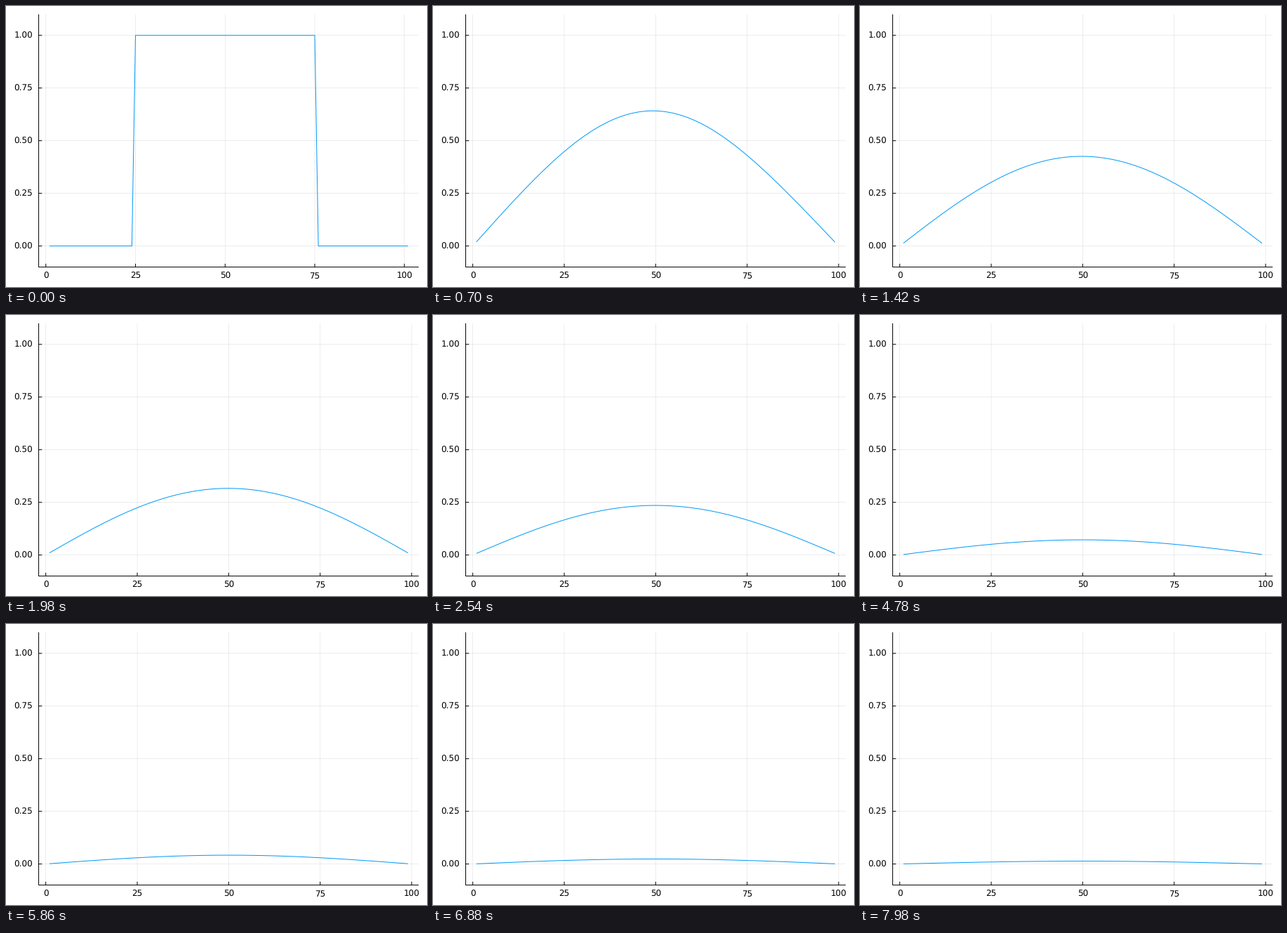
Recreate the animation shown at these times as a matplotlib script. Size 600 by 400 pixels, loop 8 s.

```python
import numpy as np
import matplotlib.pyplot as plt
from matplotlib.animation import FuncAnimation

plt.rcParams["font.family"] = "DejaVu Sans"
plt.rcParams["text.hinting"] = "none"

W, H, DPI = 600, 400, 100
PT = 72 / DPI                      # points per pixel
LEFT, RIGHT, TOP, BOTTOM = 46.57, 588.19, 11.81, 371.61
TICK = 4.72
Y_LO, Y_HI = -0.1, 1.1
X_TICKS = [0, 25, 50, 75, 100]
Y_TICKS = [0, 0.25, 0.5, 0.75, 1]

STEP_MS, LOOP_MS = 20, 8000
DT = 0.0025                        # heat equation time per picture
N = 100                            # grid intervals on [0, 1]

# Sine modes of the discrete Laplacian with zero ends
idx = np.arange(1, N)
modes = np.sin(np.pi * np.outer(idx, idx) / N)
box = ((idx >= 24) & (idx <= 74)).astype(float)
coef = modes @ box * 2 / N
rate = 2 * (1 - np.cos(np.pi * idx / N)) * N**2


def profile(k):
    """Points of the curve after k time steps."""
    if k == 0:
        x = np.arange(1, N + 2)
        return x, ((x >= 25) & (x <= 75)).astype(float)
    return idx, modes @ (coef * np.exp(-rate * DT * k))


def picture_at(ms):
    """Pictures last 20, 100 and 20 ms in turn."""
    cycle, phase = divmod(ms, 140)
    return 3 * cycle + (phase >= 20) + (phase >= 120)


def x_scale(first, last):
    pad = 0.03 * (last - first)
    lo, hi = first - pad, last + pad
    return lambda x: LEFT + (np.asarray(x) - lo) / (hi - lo) * (RIGHT - LEFT)


def to_y(v):
    return BOTTOM - (np.asarray(v) - Y_LO) / (Y_HI - Y_LO) * (BOTTOM - TOP)


def verticals(xs, y0, y1):
    """Separate vertical strokes as one broken line."""
    gap = np.nan
    return (np.ravel([[x, x, gap] for x in xs]),
            np.ravel([[y0, y1, gap] for _ in xs]))


fig = plt.figure(figsize=(W / DPI, H / DPI), dpi=DPI, facecolor="white")
ax = fig.add_axes([0, 0, 1, 1])
ax.set_xlim(0, W)
ax.set_ylim(H, 0)
ax.axis("off")


def stroke(x=(), y=(), color="black", width=1.0, **kw):
    line, = ax.plot(x, y, color=color, lw=width * PT, snap=False,
                    solid_capstyle="butt", **kw)
    return line


def label(x, y, text, ha):
    return ax.text(x, y, text, ha=ha, va="baseline", fontsize=12 * PT,
                   color="black")


y_pos = to_y(Y_TICKS)
y_grid, x_grid = verticals(y_pos, LEFT, RIGHT)
y_tick, x_tick = verticals(y_pos, LEFT, LEFT + TICK)

grid_v = stroke(width=0.7, alpha=0.1)
stroke(x_grid, y_grid, width=0.7, alpha=0.1)
stroke([LEFT, LEFT, RIGHT], [TOP, BOTTOM, BOTTOM],
       solid_joinstyle="miter")
ticks_v = stroke()
stroke(x_tick, y_tick)
curve = stroke(color="#009AF9", solid_joinstyle="round")

x_labels = [label(0, 388, str(v), "center") for v in X_TICKS]
for v, y in zip(Y_TICKS, y_pos):
    label(38.4, y + 4.4, f"{v:.2f}", "right")


def draw(n):
    x, u = profile(picture_at(n * STEP_MS))
    to_x = x_scale(x[0], x[-1])
    xs = to_x(X_TICKS)
    grid_v.set_data(*verticals(xs, TOP, BOTTOM))
    ticks_v.set_data(*verticals(xs, BOTTOM, BOTTOM - TICK))
    curve.set_data(to_x(x), to_y(u))
    for text, px in zip(x_labels, xs):
        text.set_x(px)
    return [grid_v, ticks_v, curve, *x_labels]


anim = FuncAnimation(fig, draw, frames=LOOP_MS // STEP_MS, interval=STEP_MS,
                     init_func=lambda: draw(0), repeat=True, repeat_delay=0)
plt.show()
```
